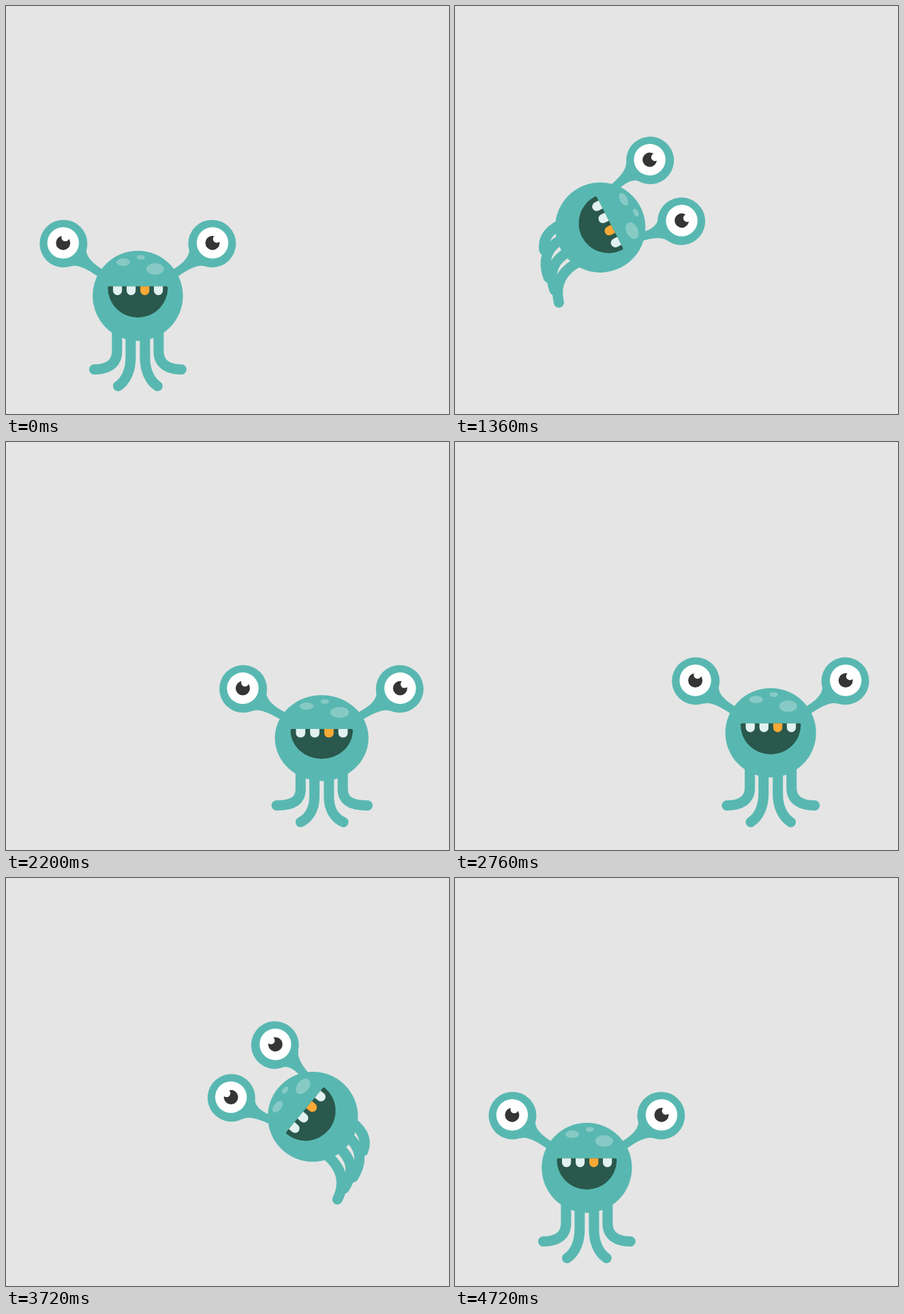
An HTML page with a canvas for the animation above (4760 ms loop, 650 by 600 pixels).

```html
<!DOCTYPE html>
<html lang="en">
<head>
<meta charset="utf-8">
<title>Somersaulting monster</title>
<style>
html, body { margin: 0; width: 100%; height: 100%; overflow: hidden; background: #e5e5e5; }
canvas { display: block; }
</style>
</head>
<body>
<canvas id="stage" width="650" height="600"></canvas>
<script>
const ctx = document.getElementById('stage').getContext('2d');
const LOOP = 4760, HALF = LOOP / 2, STEP = 40;
const LEFT_X = 193.4, RIGHT_X = 463.2, STAND_Y = 426.2;
const JUMP = 1258, AIR = 584, LIFT = 1287, LAND = 1813;
const TEAL = '#58b8b1', DARK = '#2a584c', SPOT = '#87cac5';

const clamp = v => Math.max(0, Math.min(1, v));
const lerp = (a, b, k) => a + (b - a) * k;
const span = (q, a, b) => clamp((q - a) / (b - a));
const ease = k => (1 - Math.cos(Math.PI * k)) / 2;
const mix = (a, b, k) => [lerp(a[0], b[0], k), lerp(a[1], b[1], k)];
const hop = (q, a, b) => Math.sin(Math.PI * span(q, a, b)) ** 2;
const rotate = ([x, y], a) =>
  [x * Math.cos(a) - y * Math.sin(a), x * Math.sin(a) + y * Math.cos(a)];

// 0 is upright, 1 is a clear squash
function squashAt(q) {
  if (q < 415) return hop(q, 0, 415);
  if (q < 882) return 0.8 * hop(q, 415, 882);
  if (q < 1130) return 1.45 * ease(span(q, 882, 1078));
  if (q < LIFT) return 1.45 * (1 - span(q, 1130, LIFT) ** 2);
  if (q < LAND) return 0;
  if (q < LAND + 125) return 1.7 * Math.sin(Math.PI / 2 * (q - LAND) / 125);
  return 1.7 * (1 - ease(span(q, LAND + 125, 2335)));
}

function poseAt(t) {
  const q = t % HALF, right = t < HALF;
  const raw = (q - JUMP) / AIR, p = clamp(raw);
  const dir = right ? 1 : -1;
  const s = squashAt(q);
  const flying = q >= LIFT && q < LAND;
  return {
    q, p, dir, s,
    x: lerp(right ? LEFT_X : RIGHT_X, right ? RIGHT_X : LEFT_X, ease(p)),
    y: flying ? 466 - 269 * Math.sin(Math.PI * p) : STAND_Y + 21 * s,
    angle: p === 1 ? 0 : dir * p * Math.PI * 2,
    air: ease(clamp((0.53 - Math.abs(raw - 0.5)) / 0.17)),
    smile: q > 440 && q < 1180
  };
}

function ellipse(x, y, rx, ry, color) {
  ctx.fillStyle = color;
  ctx.beginPath();
  ctx.ellipse(x, y, rx, ry, 0, 0, Math.PI * 2);
  ctx.fill();
}
const disc = (x, y, r, color) => ellipse(x, y, r, r, color);

const AIR_TIPS = [[-8, 89], [31, 102], [52, 102.5], [71, 105]];
const AIR_BENDS = [80, 95, 96, 94];

function groundLeg(side, outer, x, s, y) {
  const grow = side < 0 ? 5 : 7.5;
  return outer
    ? [[x, 508 + 6 * s - y], [x, 527 + 5 * s - y],
       [side * (45 + 2 * s), 534.5 - y], [side * (64 + grow * s), 534.5 - y]]
    : [[x, 517 + 10 * s - y], [x, 535 + 11 * s - y],
       [side * (17 + 4 * s), 551 + 5 * s - y], [side * (29 + grow * 0.88 * s), 559 - y]];
}

function airLeg(i, root, pose) {
  const slot = pose.dir > 0 ? i : 3 - i;
  const size = 1.025 - 0.175 * pose.p;
  const tip = [pose.dir * AIR_TIPS[slot][0] * size, AIR_TIPS[slot][1] * size];
  const bend = [root[0], AIR_BENDS[slot] * (1.06 - 0.3 * pose.p)];
  return [root, mix(root, bend, 2 / 3), mix(tip, bend, 2 / 3), tip]
    .map(pt => rotate(pt, pose.angle));
}

function drawLegs(pose) {
  ctx.strokeStyle = TEAL;
  ctx.lineWidth = 15;
  ctx.lineCap = ctx.lineJoin = 'round';
  [-30.5, -10.5, 10.5, 30.5].forEach((rx, i) => {
    const outer = i % 3 === 0;
    const root = [rx * (1 + 0.03 * pose.s), outer ? 50 : 56];
    const start = rotate([root[0], root[1] * (1 - 0.11 * pose.s)], pose.angle);
    const ground = groundLeg(Math.sign(rx), outer, root[0], pose.s, pose.y);
    const air = airLeg(i, root, pose);
    const [knee, c1, c2, tip] = ground.map((pt, k) => mix(pt, air[k], pose.air));
    ctx.beginPath();
    ctx.moveTo(...start);
    ctx.lineTo(...knee);
    ctx.bezierCurveTo(...c1, ...c2, ...tip);
    ctx.stroke();
  });
}

function drawEye(side, pose) {
  const { s, air, q } = pose;
  const spread = side < 0 ? 14 : q < 415 ? 6 : 12.5;
  const [ex, ey] = mix([side * (109 + spread * s), -76.8 + 10 * s], [side * 50.3 - 4.2, -110], air);
  const [ax, ay] = mix([side * (56 + 3 * s), -35 + 3 * s], [side * 41 - 2, -48.5], air);
  const toBody = Math.atan2(ay - ey, ax - ex);
  const reach = Math.hypot(ax - ex, ay - ey) + 8;
  const bend = -side * 3.8;

  // flared stalk, drawn along the line from eye to body
  ctx.save();
  ctx.translate(ex, ey);
  ctx.rotate(toBody);
  ctx.fillStyle = TEAL;
  ctx.beginPath();
  ctx.moveTo(29.5, bend / 4 - 18.4);
  ctx.quadraticCurveTo(37, bend - 3.7, reach, -6.7);
  ctx.lineTo(reach, 6.7);
  ctx.quadraticCurveTo(37, bend + 3.7, 29.5, bend / 4 + 18.4);
  ctx.lineTo(0, 0);
  ctx.fill();
  ctx.restore();

  const [dx, dy] = rotate([side * 0.6, -1], -pose.angle);
  const px = ex + dx, py = ey + dy;
  const glint = lerp(side < 0 ? -68 : -43, -88, air) * Math.PI / 180;
  disc(ex, ey, 35, TEAL);
  disc(px, py, 23.2, '#fff');
  disc(px, py, 10.5, '#353535');
  disc(px + 8.6 * Math.cos(glint), py + 8.6 * Math.sin(glint), 5.6, '#fff');
}

function drawMouth(smile) {
  if (smile) {
    ctx.strokeStyle = DARK;
    ctx.lineWidth = 6;
    ctx.beginPath();
    ctx.moveTo(-38, -5);
    ctx.bezierCurveTo(-28, 26, 26, 27, 37.5, -7.5);
    ctx.stroke();
    return;
  }
  ctx.fillStyle = DARK;
  ctx.beginPath();
  ctx.moveTo(-42, -14);
  ctx.lineTo(42, -14);
  ctx.quadraticCurveTo(44, -14, 44, -12);
  ctx.ellipse(0, -12, 44, 44, 0, 0, Math.PI);
  ctx.quadraticCurveTo(-44, -14, -42, -14);
  ctx.fill();
  [-29.8, -9.8, 10.3, 30.2].forEach((x, i) => {
    ctx.fillStyle = i === 2 ? '#f9a936' : '#e1f1ef';
    ctx.beginPath();
    ctx.moveTo(x - 6.6, -14);
    ctx.lineTo(x + 6.6, -14);
    ctx.lineTo(x + 6.6, -7.5);
    ctx.arc(x, -7.5, 6.6, 0, Math.PI);
    ctx.fill();
  });
}

function draw(t) {
  const pose = poseAt(t);
  ctx.fillStyle = '#e5e5e5';
  ctx.fillRect(0, 0, 650, 600);
  ctx.save();
  ctx.translate(pose.x, pose.y);
  drawLegs(pose);
  ctx.rotate(pose.angle);
  drawEye(-1, pose);
  drawEye(1, pose);
  ctx.scale(1 + 0.086 * pose.s, 1 - 0.105 * pose.s);
  disc(0, 0, 66.2, TEAL);
  ellipse(-21.3, -49.4, 10, 5.5, SPOT);
  ellipse(4.4, -56.5, 6, 3.5, SPOT);
  ellipse(25.4, -39.5, 13, 8.5, SPOT);
  ctx.translate(0, -1.8 * pose.air);
  drawMouth(pose.smile);
  ctx.restore();
}

const begin = performance.now();
function tick() {
  const t = (performance.now() - begin) % LOOP;
  draw(Math.floor(t / STEP) * STEP);
  requestAnimationFrame(tick);
}
tick();
</script>
</body>
</html>
```
